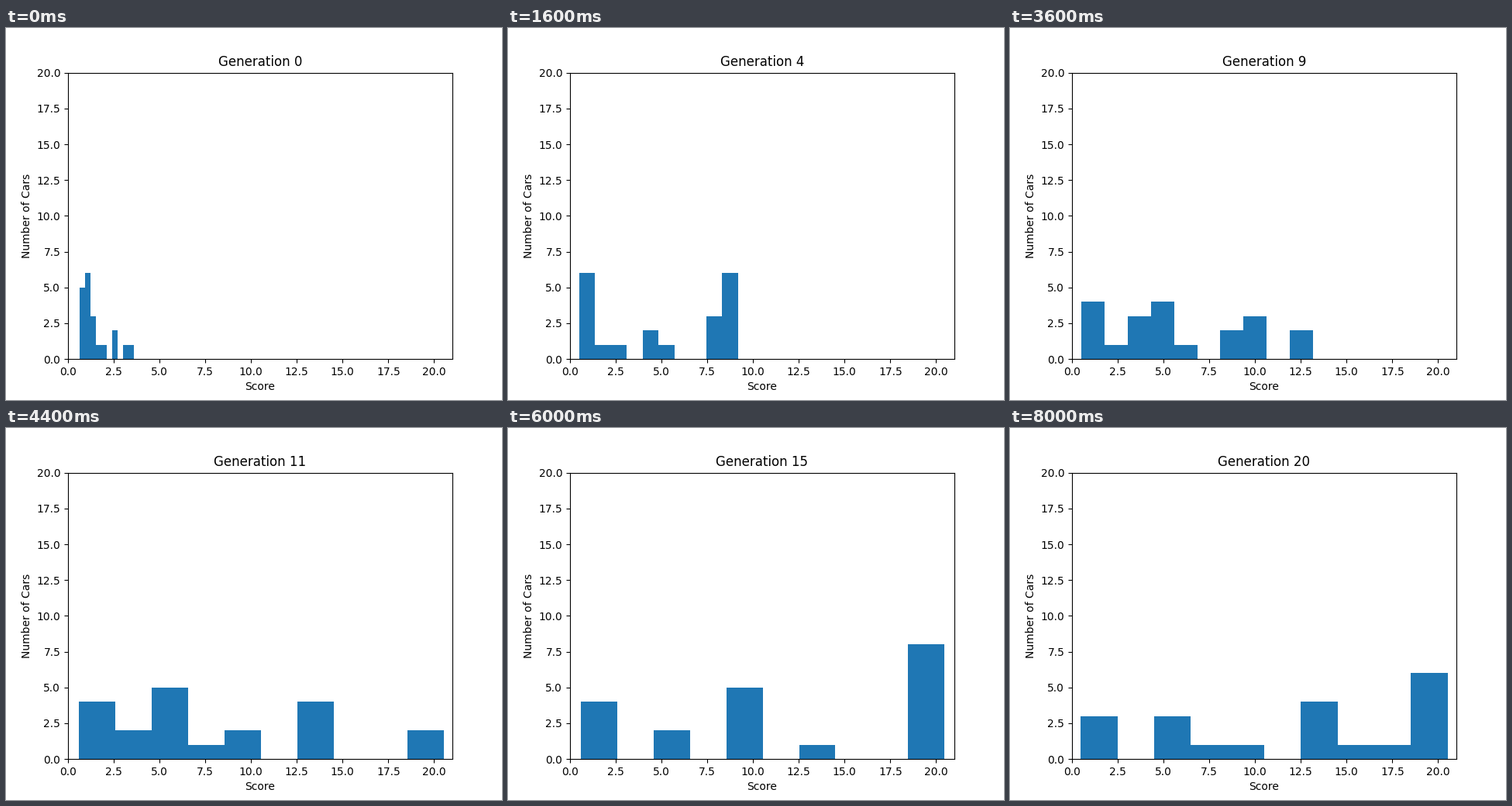
Animation, 640 px wide and 480 px high, one loop 8.4 s. Source, as a matplotlib script:

```python
import matplotlib.pyplot as plt
import numpy as np
from matplotlib.animation import FuncAnimation

GENERATIONS = 21
CARS = 20
BINS = 10

# Key generations: lowest score, highest score, cars per bin
KEYS = {
    0: (.636, 3.6, [5, 6, 3, 1, 1, 0, 2, 0, 1, 1]),
    4: (.504, 9.183, [6, 1, 1, 0, 2, 1, 0, 0, 3, 6]),
    7: (.478, 12.457, [4, 0, 2, 5, 1, 0, 0, 7, 0, 1]),
    11: (.576, 20.526, [4, 2, 5, 1, 2, 0, 4, 0, 0, 2]),
    15: (.605, 20.453, [4, 0, 2, 0, 5, 0, 1, 0, 0, 8]),
    18: (.512, 20.504, [6, 1, 3, 0, 2, 0, 1, 4, 0, 3]),
    20: (.483, 20.526, [3, 0, 3, 1, 1, 0, 4, 1, 1, 6]),
}
LOWS, HIGHS, COUNTS = zip(*KEYS.values())

# The best score stalls around 13, then leaps to its final level
BEST = dict(zip(KEYS, HIGHS)) | {6: 13.29, 9: 13.16, 10: 20.28}
BEST = dict(sorted(BEST.items()))


def bin_edges(gen):
    low = np.interp(gen, list(KEYS), LOWS)
    high = np.interp(gen, list(BEST), list(BEST.values()))
    return np.linspace(low, high, BINS + 1)


def bin_counts(gen):
    """Blend running totals so the whole population is always counted."""
    totals = np.cumsum(COUNTS, axis=1).T
    blended = [np.interp(gen, list(KEYS), row) for row in totals]
    return np.diff(np.round(blended), prepend=0)


def draw(gen):
    ax.clear()
    edges = bin_edges(gen)
    ax.bar(edges[:-1], bin_counts(gen), width=np.diff(edges), align="edge")
    ax.set_xlim(0, 21)
    ax.set_ylim(0, CARS)
    ax.set_title(f"Generation {gen}")
    ax.set_xlabel("Score")
    ax.set_ylabel("Number of Cars")


fig, ax = plt.subplots(figsize=(6.4, 4.8), dpi=100)
anim = FuncAnimation(fig, draw, frames=GENERATIONS, init_func=lambda: draw(0),
                     interval=400, repeat=True, repeat_delay=0)
plt.show()
```
